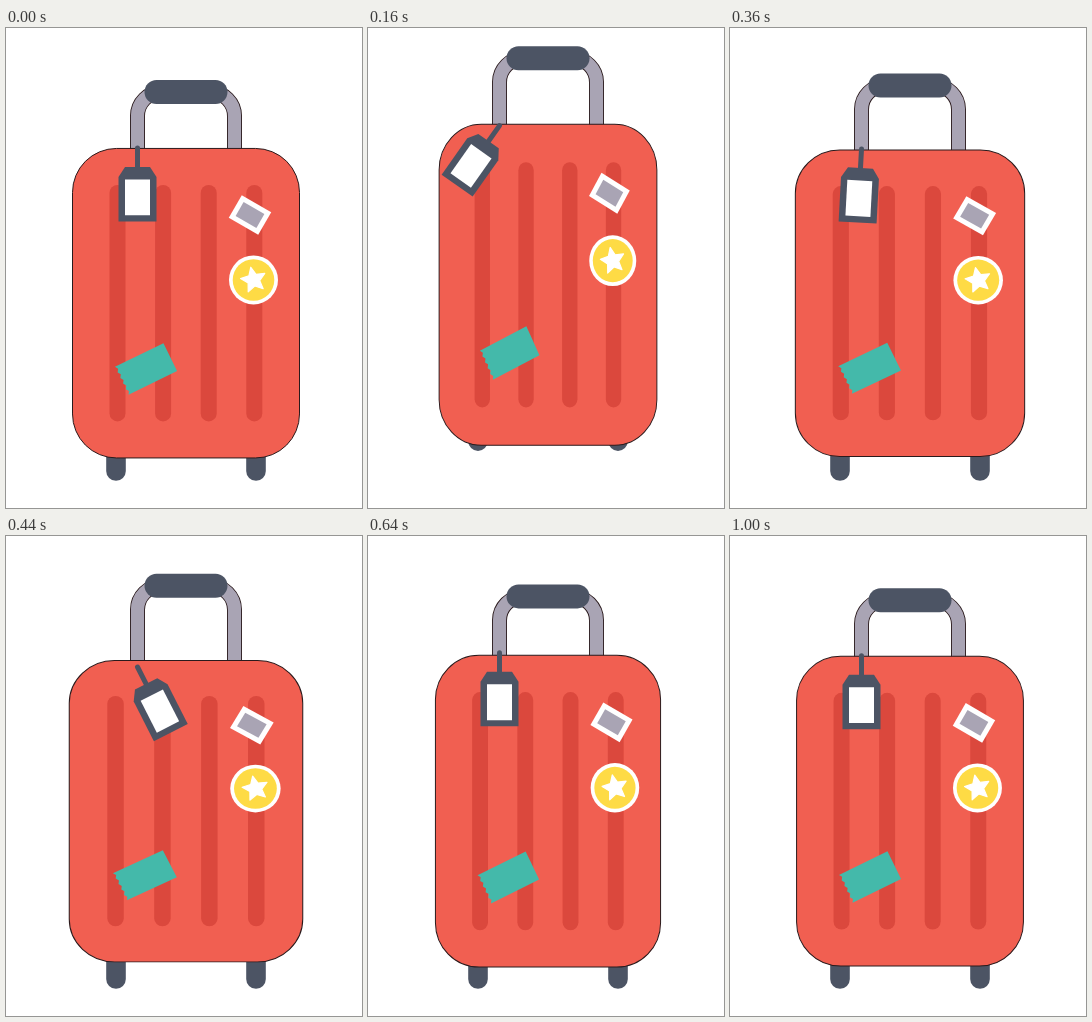
Recreate the animation shown at these times as an HTML page with a canvas. Size 356x480 px, loop 1040 ms.

```html
<!DOCTYPE html>
<html lang="en">
<head>
<meta charset="utf-8">
<title>Hopping suitcase</title>
<style>
  html, body { margin: 0; width: 100%; height: 100%; overflow: hidden; background: #fff; }
  canvas { display: block; width: 356px; height: 480px; }
</style>
</head>
<body>
<canvas id="stage" width="356" height="480"></canvas>
<script>
const ctx = document.getElementById('stage').getContext('2d');
const LOOP = 1040, STEP = 40, LAND = 340;
const DARK = '#4c5464', GREY = '#a9a4b4', RED = '#f15f51', GROOVE = '#db483d';
const TEAL = '#44b9aa', YELLOW = '#fedb45', WHITE = '#fff', LINE = '#2a1a1c';

// Ballistic hop from 0 to 1 and back, highest at the given time.
const hop = (t, peak) => Math.max(0, 1 - ((t - peak) / peak) ** 2);

// Damped wobble after landing; 1 at its first crest.
function ring(t) {
  const s = t - LAND - 100;
  return t < LAND ? 0 : Math.exp(-s / 160) * Math.cos(Math.PI * s / 200);
}

function ease(t, from, to) {
  const u = Math.min(1, Math.max(0, (t - from) / (to - from)));
  return u * u * (3 - 2 * u);
}

const bodyY = t => 275.2 - 18.5 * hop(t, 172);
const widen = t => 6.5 * ring(t) - 9.4 * hop(t, 185);
const legY = t => -30 * hop(t, 170);
const tagY = t => 11 * ring(t) - 23 * hop(t, 190);
const handleY = t => -34 * hop(t, 150) - 8.3 * ring(t) - 6 * (ease(t, 300, 440) - ease(t, 840, 1000));

// One swing out, one swing back.
function tagTurn(t) {
  if (t < 370) return 36 * Math.sin(Math.PI * t / 370);
  return t < 630 ? -36 * Math.sin(Math.PI * (t - 370) / 260) : 0;
}

function at(x, y, deg, draw) {
  ctx.save();
  ctx.translate(x, y);
  ctx.rotate(deg * Math.PI / 180);
  draw();
  ctx.restore();
}

function box(x, y, w, h, r, color) {
  ctx.beginPath();
  ctx.roundRect(x, y, w, h, r);
  ctx.fillStyle = color;
  ctx.fill();
}

function disc(r, color) {
  box(-r, -r, 2 * r, 2 * r, r, color);
}

function poly(points, color) {
  ctx.beginPath();
  points.forEach(([x, y]) => ctx.lineTo(x, y));
  ctx.closePath();
  ctx.fillStyle = color;
  ctx.fill();
}

function outline(color, width) {
  ctx.strokeStyle = color;
  ctx.lineWidth = width;
  ctx.stroke();
}

function handle() {
  ctx.beginPath();
  ctx.moveTo(131.5, 210);
  ctx.arcTo(131.5, 64, 180, 64, 24);
  ctx.arcTo(228.5, 64, 228.5, 210, 24);
  ctx.lineTo(228.5, 210);
  outline(LINE, 15);
  outline(GREY, 13.2);
  box(138.5, 52, 83, 24, 12, DARK);
}

function legs() {
  for (const x of [110, 250]) box(x - 9.8, 390, 19.6, 62.8, 9.8, DARK);
}

function photo() {
  box(-17, -13, 34, 26, 0, WHITE);
  box(-12, -8, 24, 16, 0, GREY);
}

function badge() {
  disc(24.5, WHITE);
  disc(20.8, YELLOW);
  const star = [];
  for (let i = 0; i < 10; i++) {
    const r = i % 2 ? 6.2 : 13, a = (i * 36 - 102) * Math.PI / 180;
    star.push([r * Math.cos(a), r * Math.sin(a)]);
  }
  poly(star, WHITE);
  ctx.lineJoin = 'round';
  outline(WHITE, 1.2);
}

function ticket() {
  const edge = [[27, -15.5], [27, 15.5]];
  for (let i = 0; i <= 10; i++) edge.push([i % 2 ? -25 : -27, 15.5 - i * 3.1]);
  poly(edge, TEAL);
}

// Stretching keeps the area roughly constant.
function body(t) {
  const dw = widen(t);
  ctx.save();
  ctx.translate(180, bodyY(t));
  ctx.scale(1 + dw / 227, 1 - 1.25 * dw / 309.5);
  box(-113.5, -154.75, 227, 309.5, 44, RED);
  outline(LINE, 1);
  for (let i = 0; i < 4; i++) box(-76.5 + i * 45.6, -118.25, 16, 236.5, 8, GROOVE);
  at(64, -88.25, 30, photo);
  at(67.5, -23.25, 0, badge);
  at(-40, 65.75, -26, ticket);
  ctx.restore();
}

function tag() {
  ctx.beginPath();
  ctx.moveTo(0, 0);
  ctx.lineTo(0, 24);
  ctx.lineCap = 'round';
  outline(DARK, 5);
  ctx.lineCap = 'butt';
  poly([[-12.5, 19], [12.5, 19], [19, 29], [19, 73.5], [-19, 73.5], [-19, 29]], DARK);
  box(-12.5, 31.5, 25, 35.8, 0, WHITE);
}

function draw(t) {
  ctx.fillStyle = WHITE;
  ctx.fillRect(0, 0, 356, 480);
  at(0, handleY(t), 0, handle);
  at(0, legY(t), 0, legs);
  body(t);
  at(131.5, 120 + tagY(t), tagTurn(t), tag);
}

const start = performance.now();
function tick() {
  const t = (performance.now() - start) % LOOP;
  draw(Math.floor(t / STEP) * STEP);
  requestAnimationFrame(tick);
}
tick();
</script>
</body>
</html>
```
